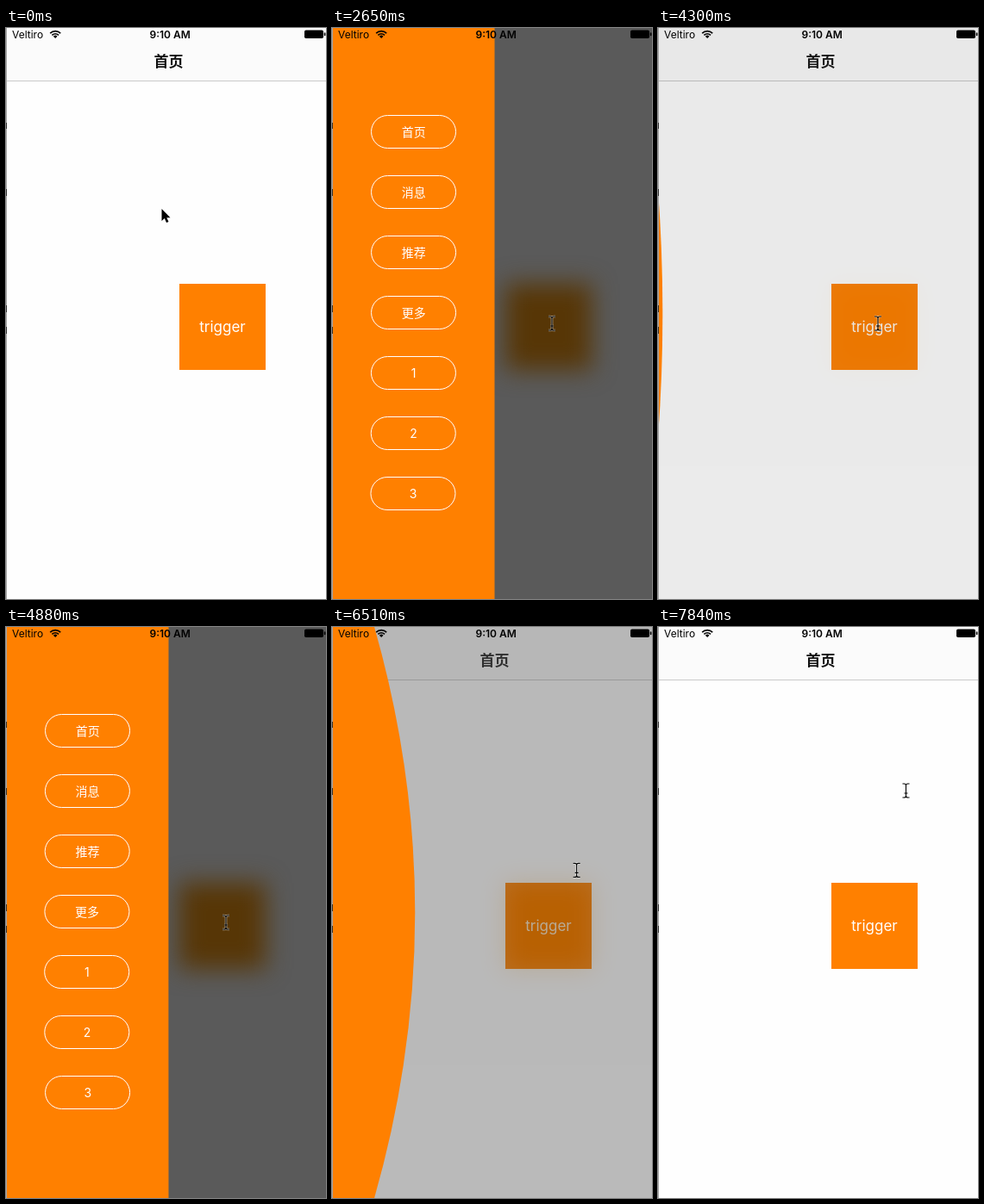
An HTML page for the animation above (8 s loop, 371 by 663 pixels).

```html
<!DOCTYPE html>
<html lang="zh-CN">
<head>
<meta charset="utf-8">
<title>Slide menu</title>
<style>
html, body { margin: 0; width: 100%; height: 100%; overflow: hidden; background: #fefefe; }
svg { display: block; width: 100vw; height: 100vh; }
text { font-family: Inter, "Noto Sans CJK SC", "Noto Sans CJK", sans-serif; }
.mid { text-anchor: middle; }
</style>
</head>
<body>
<svg viewBox="0 0 371 663">
  <defs>
    <filter id="soft" x="-100%" y="-100%" width="300%" height="300%" color-interpolation-filters="sRGB">
      <feGaussianBlur stdDeviation="14"/>
    </filter>
  </defs>

  <rect width="371" height="663" fill="#fefefe"/>
  <rect width="371" height="61" fill="#fbfbfb"/>
  <rect y="61" width="371" height="1" fill="#c9c9c9"/>
  <text class="mid" x="188.5" y="45" font-size="17" font-weight="600" fill="#111">首页</text>
  <rect x="201" y="297" width="100" height="100" fill="#ff8000"/>
  <text class="mid" x="251" y="353" font-size="17" fill="#fff">trigger</text>

  <g id="shade" opacity="0">
    <rect x="1" width="370" height="663" fill="#5a5a5a"/>
    <rect x="201" y="297" width="100" height="100" fill="#573606" filter="url(#soft)"/>
  </g>

  <g id="menu">
    <path id="sheet" fill="#ff8000"/>
    <g id="items"></g>
  </g>

  <rect width="1" height="663" fill="#a6a6a6"/>
  <g fill="#333">
    <rect y="110" width="1" height="7"/>
    <rect y="187" width="1" height="8"/>
    <rect y="322" width="1" height="8"/>
    <rect y="347" width="1" height="8"/>
  </g>

  <g id="status">
    <text x="7" y="11.5" font-size="12">Veltiro</text>
    <g fill="none" stroke="#000" stroke-width="1.7">
      <path d="M51.2 6.1A8.6 8.6 0 0 1 63.2 6.1"/>
      <path d="M53.4 8.3A5.4 5.4 0 0 1 61 8.3"/>
    </g>
    <path d="M57.2 12L54.9 9.7A3.2 3.2 0 0 1 59.5 9.7Z"/>
    <text class="mid" x="190.2" y="11.5" font-size="12" font-weight="600">9:10 AM</text>
    <rect x="346" y="2.5" width="22" height="9.5" rx="1.8"/>
    <rect x="368.8" y="5.2" width="1.6" height="4" rx=".8"/>
  </g>

  <path id="arrow" d="M0 0V14L3.3 11L5.5 16L8 15L5.8 10.2H10Z" stroke="#fff" stroke-width="1.4" paint-order="stroke"/>
  <g id="beam" fill="none">
    <path d="M-4 -8H-2Q0 -8 0 -6Q0 -8 2 -8H4M0 -6V6M-4 8H-2Q0 8 0 6Q0 8 2 8H4M-2 3H2" stroke="#fff" stroke-opacity=".55" stroke-width="2.6"/>
    <path d="M-4 -8H-2Q0 -8 0 -6Q0 -8 2 -8H4M0 -6V6M-4 8H-2Q0 8 0 6Q0 8 2 8H4M-2 3H2" stroke="#000" stroke-width="1.1"/>
  </g>
</svg>

<script>
const LOOP = 8000, STEP = 148;
const EDGE = 188.5, HIDE = 238, REACH = 208;
const LABELS = ['首页', '消息', '推荐', '更多', '1', '2', '3'];

// [time, menu open]
const TOGGLES = [
  [1709, 1], [3200, 0], [4216, 1], [5219, 0], [6371, 1], [7500, 0]
];
// [time, x, y]
const POINTER = [
  [0, 180.5, 210], [142, 183, 211], [290, 183, 211], [438, 178, 212],
  [586, 190, 232], [734, 215, 275], [882, 242, 322], [1030, 255, 343],
  [5550, 255, 343], [6060, 280, 325], [6380, 282, 322], [6800, 287.5, 190]
];
const BEAM_AT = 1615;

const $ = id => document.getElementById(id);
const shade = $('shade'), menu = $('menu'), sheet = $('sheet');
const arrow = $('arrow'), beam = $('beam');

$('items').innerHTML = LABELS.map((label, i) => `<g>
  <rect x="45.5" y="${101.5 + 70 * i}" width="98" height="38" rx="19" fill="none" stroke="#fff"/>
  <text class="mid" x="94.7" y="${125.5 + 70 * i}" font-size="14" fill="#fff">${label}</text>
</g>`).join('');
const items = [...$('items').children];

const shift = (el, x, y = 0) => el.setAttribute('transform', `translate(${x.toFixed(2)} ${y.toFixed(2)})`);

// cubic-bezier(.42, 0, .58, 1)
function easeInOut(x) {
  if (x <= 0) return 0;
  if (x >= 1) return 1;
  let lo = 0, hi = 1, u = .5;
  for (let i = 0; i < 24; i++) {
    u = (lo + hi) / 2;
    const v = 1 - u;
    if (1.26 * u * v * v + 1.74 * u * u * v + u ** 3 < x) lo = u; else hi = u;
  }
  return u * u * (3 - 2 * u);
}

// Damped spring from 0 to 1 that settles in about 0.7 s
function spring(sec, damping, speed) {
  if (sec <= 0) return 0;
  const decay = 6.9 / .7;
  const freq = decay / damping * Math.sqrt(1 - damping ** 2);
  return 1 - Math.exp(-decay * sec) *
    (Math.cos(freq * sec) + (decay - speed) / freq * Math.sin(freq * sec));
}

function pointerAt(t) {
  const i = POINTER.findIndex(p => p[0] > t);
  if (i < 0) return POINTER[POINTER.length - 1].slice(1);
  const a = POINTER[i - 1], b = POINTER[i];
  const k = (t - a[0]) / (b[0] - a[0]);
  return [a[1] + (b[1] - a[1]) * k, a[2] + (b[2] - a[2]) * k];
}

function drawMenu(t) {
  const [start, open] = TOGGLES.filter(e => e[0] <= t).pop() || [-LOOP, 0];
  const sec = (t - start) / 1000;
  const p = easeInOut(sec / .3);
  const shown = open ? p : 1 - p;
  const bulge = open
    ? spring(sec, .5, .9) - spring(sec, .8, 2)
    : spring(sec, .7, 2) - spring(sec, .6, .9);

  shade.setAttribute('opacity', shown.toFixed(4));
  menu.style.display = shown > 0 ? '' : 'none';
  shift(menu, -HIDE * (1 - shown));
  sheet.setAttribute('d',
    `M0 0H${EDGE}Q${(EDGE + bulge * REACH).toFixed(2)} 331.5 ${EDGE} 663H0Z`);
  items.forEach((el, i) => {
    const k = open ? spring(sec - i * .3 / LABELS.length, .6, 0) : 1;
    shift(el, -90 * (1 - k));
  });
}

function drawPointer(t) {
  const isBeam = t >= BEAM_AT;
  arrow.style.display = isBeam ? 'none' : '';
  beam.style.display = isBeam ? '' : 'none';
  shift(isBeam ? beam : arrow, ...pointerAt(t));
}

function draw(ms) {
  // The picture advances in held steps
  const n = Math.floor((ms % LOOP + 10) / STEP);
  const t = Math.max(0, n * STEP - 6);
  drawMenu(t);
  drawPointer(t);
}

const begin = performance.now();
function tick(now) {
  draw(Math.max(0, now - begin));
  requestAnimationFrame(tick);
}
draw(0);
requestAnimationFrame(tick);
</script>
</body>
</html>
```
